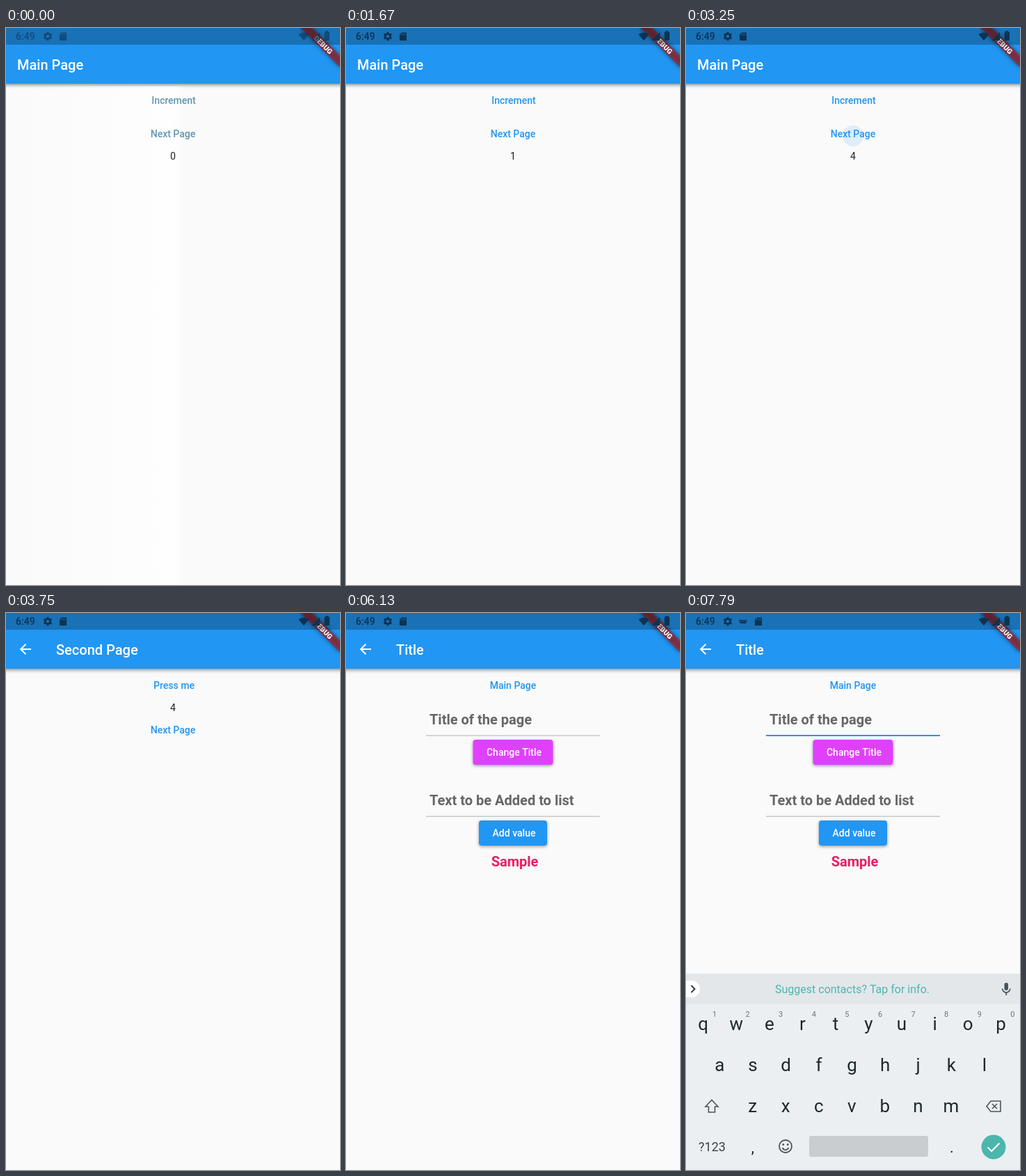
Recreate the animation shown at these times as an HTML page with a canvas. Size 480 px wide and 800 px high, loop 8000 ms.

```html
<!DOCTYPE html>
<html lang="en">
<head>
<meta charset="utf-8">
<title>Page demo</title>
<style>
  html, body { margin: 0; width: 100%; height: 100%; overflow: hidden; background: #fafafa; }
  canvas { display: block; width: 480px; height: 800px; }
</style>
</head>
<body>
<canvas id="stage" width="480" height="800"></canvas>
<script>
const ctx = document.getElementById('stage').getContext('2d');
const W = 480, H = 800, LOOP = 8000;
const PAPER = '#fafafa', BLUE = '#2196f3', INK = '#212121', STATUS = '#0d3352', BAR = '#1971b6';

const clamp = (v) => Math.min(1, Math.max(0, v));
const ramp = (t, from, to) => clamp((t - from) / (to - from));

// Cubic bezier easing, solved by bisection
function bezier(x1, y1, x2, y2) {
  const at = (a, b, s) => 3 * a * s * (1 - s) ** 2 + 3 * b * s * s * (1 - s) + s ** 3;
  return (x) => {
    let lo = 0, hi = 1;
    for (let i = 0; i < 20; i++) {
      const mid = (lo + hi) / 2;
      if (at(x1, x2, mid) < x) lo = mid; else hi = mid;
    }
    return at(y1, y2, lo);
  };
}
const slideEase = bezier(0.4, 0, 0.2, 1);
const fadeEase = bezier(0.42, 0, 1, 1);

function text(s, x, y, size, color, weight = 400, align = 'center') {
  ctx.font = `${weight} ${size}px Roboto, sans-serif`;
  ctx.textAlign = align;
  ctx.fillStyle = color;
  ctx.fillText(s, x, y);
}

function box(x, y, w, h, r, color) {
  ctx.fillStyle = color;
  ctx.beginPath();
  ctx.roundRect(x, y, w, h, r);
  ctx.fill();
}

function disc(x, y, r, color) {
  ctx.fillStyle = color;
  ctx.beginPath();
  ctx.arc(x, y, r, 0, Math.PI * 2);
  ctx.fill();
}

function poly(points, color, width = 0) {
  ctx.beginPath();
  points.forEach(([x, y]) => ctx.lineTo(x, y));
  if (width) {
    ctx.strokeStyle = color;
    ctx.lineWidth = width;
    ctx.stroke();
  } else {
    ctx.fillStyle = color;
    ctx.fill();
  }
}

function group(alpha, dy, draw) {
  ctx.save();
  ctx.globalAlpha *= alpha;
  ctx.translate(0, dy);
  draw();
  ctx.restore();
}

function shadow(color, blur, dy) {
  ctx.shadowColor = color;
  ctx.shadowBlur = blur;
  ctx.shadowOffsetY = dy;
}

// Touch ripple clipped to its button
function ripple(t, { down, up, x, y, area }) {
  if (t < down || t > up + 200) return;
  const grow = (d) => 50 * (d / 340) ** 1.6;
  const r = t < up ? grow(t - down) : grow(up - down) + 0.35 * (t - up);
  ctx.save();
  ctx.globalAlpha *= 1 - ramp(t, up, up + 200);
  ctx.beginPath();
  ctx.roundRect(...area, 4);
  ctx.clip();
  disc(x, y, Math.min(r, 90), 'rgba(33,150,243,.13)');
  ctx.restore();
}

const tap = (down, up, x, y, area) => ({ down, up, x, y, area });
const INCREMENT = [199, 86, 83, 36], PRESS = [201, 86, 79, 36];
const taps = [[1000, 1400], [1710, 1900], [2080, 2230], [2450, 2640]]
  .map(([down, up]) => tap(down, up, 241, 106, INCREMENT));
const toSecond = tap(3090, 3290, 240, 155, [198, 134, 84, 36]);
const pressMe = tap(4770, 5250, 240, 105, PRESS);
const toTitle = tap(5470, 6040, 240, 169, [198, 150, 84, 36]);

function page(title, back) {
  ctx.fillStyle = PAPER;
  ctx.fillRect(0, 0, W, H);
  ctx.save();
  shadow('rgba(0,0,0,.45)', 5, 2);
  ctx.fillStyle = BLUE;
  ctx.fillRect(-10, 0, W + 20, 80);
  ctx.restore();
  if (back) {
    poly([[36, 52], [21.5, 52]], '#fff', 2);
    poly([[28.5, 44.7], [21.2, 52], [28.5, 59.3]], '#fff', 2);
  }
  text(title, back ? 72 : 16, 60, 20, '#fff', 500, 'left');
}

function mainPage(t) {
  page('Main Page', false);
  const rough = 1 - ramp(t, 0, 500);
  if (rough) {
    const g = ctx.createLinearGradient(0, 0, W, 0);
    g.addColorStop(0, 'rgba(255,255,255,0)');
    g.addColorStop(0.5, `rgba(255,255,255,${rough * 0.8})`);
    g.addColorStop(0.54, 'rgba(255,255,255,0)');
    ctx.fillStyle = g;
    ctx.fillRect(0, 84, W, H - 84);
  }
  [...taps, toSecond].forEach((p) => ripple(t, p));
  const mix = (a, b) => Math.round(a + (b - a) * rough);
  const link = `rgb(${mix(33, 98)},${mix(150, 150)},${mix(243, 175)})`;
  text('Increment', 241, 109, 14, link, 500);
  text('Next Page', 240, 157, 14, link, 500);
  text(taps.filter((p) => t >= p.up).length, 240, 189, 14, INK);
}

function secondPage(t) {
  page('Second Page', true);
  ripple(t, pressMe);
  ripple(t, toTitle);
  text('Press me', 241.5, 109, 14, BLUE, 500);
  text(t < pressMe.up ? 4 : 5, 240, 141, 14, INK);
  text('Next Page', 240, 173, 14, BLUE, 500);
}

function field(hint, y, focus) {
  text(hint, 120, y, 20, '#666', 700, 'left');
  ctx.fillStyle = '#bbb';
  ctx.fillRect(115, y + 15.5, 250, 1.2);
  if (!focus) return;
  ctx.fillStyle = BLUE;
  ctx.fillRect(240 - 125 * focus, y + 15, 250 * focus, 2);
}

function button(label, x, y, w, color) {
  ctx.save();
  shadow('rgba(0,0,0,.4)', 4, 1.5);
  box(x, y, w, 36, 4, color);
  ctx.restore();
  text(label, 241.5, y + 23, 14, '#fff', 500);
}

function titlePage(t) {
  page('Title', true);
  text('Main Page', 240, 109, 14, BLUE, 500);
  field('Title of the page', 160, ramp(t, 7100, 7300));
  if (t >= 7040 && t < 7500) {
    ctx.fillStyle = BLUE;
    ctx.fillRect(115, 144, 2, 18);
  }
  button('Change Title', 182.5, 182, 115, '#e040fb');
  field('Text to be Added to list', 276, 0);
  button('Add value', 191, 298, 98, BLUE);
  text('Sample', 242.5, 364, 20, '#e91e63', 700);
}

function keyRow(keys, x, y) {
  [...keys].forEach((k, i) => text(k, x + i * 47.55, y, 26, '#1d282d'));
}

function keyboard() {
  const icon = '#4a565c';
  ctx.fillStyle = '#eceff1';
  ctx.fillRect(0, 518, W, 400);
  ctx.fillStyle = '#e3e7ea';
  ctx.fillRect(0, 518, W, 44);
  box(-12, 528, 32, 24, 12, '#fff');
  poly([[7.5, 535], [12.5, 540], [7.5, 545]], '#2f383c', 1.9);
  text('Suggest contacts? Tap for info.', 239, 546, 16, '#4db6ac');

  box(457.5, 531, 5.5, 11, 2.75, icon);
  ctx.strokeStyle = icon;
  ctx.lineWidth = 1.7;
  ctx.beginPath();
  ctx.arc(460.2, 539.5, 5.6, 0, Math.PI);
  ctx.stroke();
  poly([[460.2, 545], [460.2, 549]], icon, 1.8);

  keyRow('qwertyuiop', 24.7, 599);
  [...'1234567890'].forEach((n, i) => text(n, 41 + i * 47.6, 580, 11, '#69757b'));
  keyRow('asdfghjkl', 48.4, 658);
  keyRow('zxcvbnm', 95.6, 717);

  poly([[37, 699.5], [46, 709], [41.5, 709], [41.5, 717], [32.5, 717],
    [32.5, 709], [28, 709], [37, 699.5], [46, 709]], icon, 1.6);
  poly([[438, 701], [452, 701], [452, 716], [438, 716], [432, 708.5],
    [438, 701], [452, 701]], icon, 1.6);
  poly([[440, 705], [447, 712]], icon, 1.6);
  poly([[447, 705], [440, 712]], icon, 1.6);

  text('?123', 37.5, 773, 18, '#37444a');
  text(',', 96, 775, 22, '#1d282d');
  text('.', 382, 775, 22, '#1d282d');
  ctx.strokeStyle = icon;
  ctx.lineWidth = 1.8;
  ctx.beginPath();
  ctx.arc(143, 766, 9, 0, Math.PI * 2);
  ctx.stroke();
  disc(139.8, 763.5, 1.4, icon);
  disc(146.2, 763.5, 1.4, icon);
  ctx.beginPath();
  ctx.arc(143, 766.5, 4.6, 0.3, Math.PI - 0.3);
  ctx.stroke();
  box(177, 751, 171, 30, 3, '#c9cdd0');
  disc(442, 767, 17.5, '#4db6ac');
  poly([[433.5, 767.5], [439.2, 773], [450.5, 761.5]], '#fff', 2);
}

function sdCard(x) {
  poly([[x - 2, 6.5], [x + 5, 6.5], [x + 5, 18], [x - 5, 18], [x - 5, 9.5]], STATUS);
  ctx.fillStyle = BAR;
  [-2.2, 0.3, 2.8].forEach((d) => ctx.fillRect(x + d - 0.5, 8, 1, 2.5));
}

function statusBar(t) {
  ctx.fillStyle = 'rgba(0,0,0,.25)';
  ctx.fillRect(0, 0, W, 24);
  group(0.6 + 0.4 * ramp(t, 0, 500), 0, () => {
    text('6:49', 14, 17, 14, STATUS, 500, 'left');
    ctx.strokeStyle = STATUS;
    ctx.lineWidth = 2.6;
    ctx.beginPath();
    ctx.arc(60, 12, 3.5, 0, Math.PI * 2);
    ctx.stroke();
    for (let i = 0; i < 6; i++) {
      const a = i * Math.PI / 3 + Math.PI / 6, c = Math.cos(a), s = Math.sin(a);
      poly([[60 + 4 * c, 12 + 4 * s], [60 + 6.2 * c, 12 + 6.2 * s]], STATUS, 3);
    }
    const typing = t >= 7250;
    if (typing) {
      poly([[76, 10], [88, 10], [86, 15], [78, 15]], STATUS);
      ctx.fillStyle = BAR;
      for (let i = 0; i < 4; i++) ctx.fillRect(77.8 + i * 2.4, 11.2, 1.2, 1.2);
    }
    sdCard(typing ? 104 : 82);

    ctx.fillStyle = STATUS;
    ctx.beginPath();
    ctx.moveTo(428, 18);
    ctx.arc(428, 18, 11.5, -Math.PI * 0.73, -Math.PI * 0.27);
    ctx.fill();
    poly([[451, 6], [451, 18], [439, 18]], STATUS);
    box(457.5, 5.5, 7.5, 12.5, 1, STATUS);
    ctx.fillRect(459.5, 4, 3.5, 2);
  });
}

// Translucent corner ribbon over its own soft shadow
function banner() {
  ctx.save();
  ctx.translate(W, 0);
  ctx.rotate(Math.PI / 4);
  ctx.save();
  shadow('rgba(0,0,0,.5)', 6, 0);
  ctx.shadowOffsetX = -1000;
  ctx.translate(1000 * Math.SQRT1_2, -1000 * Math.SQRT1_2);
  ctx.fillStyle = '#000';
  ctx.fillRect(-40, 28, 80, 12);
  ctx.restore();
  ctx.fillStyle = 'rgba(183,28,28,.63)';
  ctx.fillRect(-40, 28, 80, 12);
  text('DEBUG', 0, 37.7, 10.2, '#fff', 900);
  ctx.restore();
}

function draw(t) {
  if (t < 3590) mainPage(t);
  if (t >= 3290 && t < 6080) {
    const p = ramp(t, 3290, 3590);
    group(fadeEase(p), 200 * (1 - slideEase(p)), () => secondPage(t));
  }
  if (t >= 6040) {
    const p = ramp(t, 5880, 6080);
    group(fadeEase(p), 200 * (1 - slideEase(p)), () => titlePage(t));
  }
  if (t >= 7050) {
    const p = ramp(t, 7050, 7300);
    group(clamp(p * 3.1), 110 * (1 - p) ** 2, keyboard);
  }
  banner();
  statusBar(t);
}

function tick(now) {
  draw(now % LOOP);
  requestAnimationFrame(tick);
}
requestAnimationFrame(tick);
</script>
</body>
</html>
```
